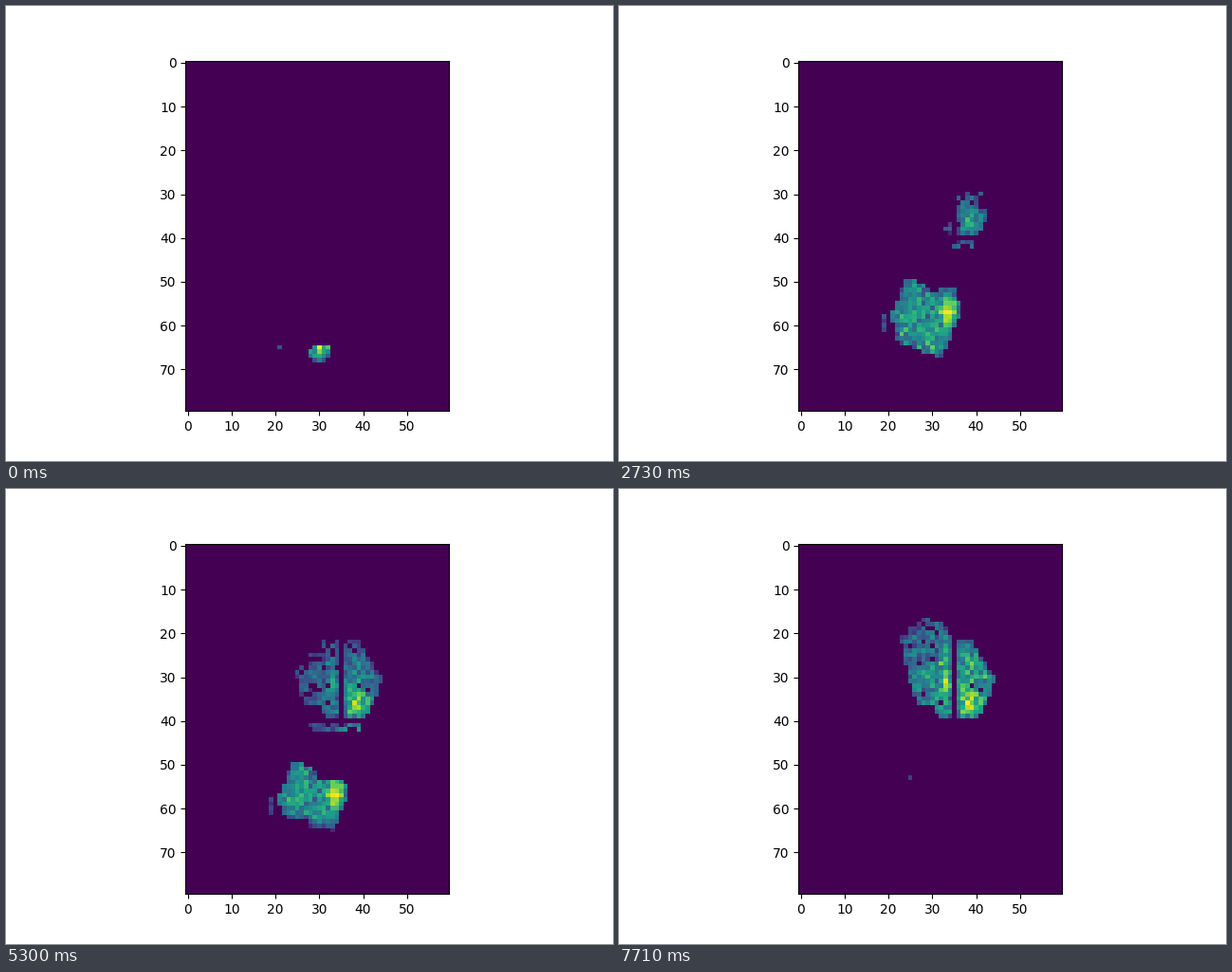
These frames come from a looping animation (640x480 px, 8 s). A matplotlib script:

```python
import numpy as np
import matplotlib.pyplot as plt
from matplotlib.animation import FuncAnimation
from matplotlib.path import Path

ROWS, COLS = 80, 60
TICK, LOOP = 40, 8000

rng = np.random.default_rng(12)
r, c = np.mgrid[0:ROWS, 0:COLS].astype(float)
grain = np.clip(rng.normal(0, 0.12, r.shape), -0.25, 0.25)
delay = rng.exponential(1, r.shape)
jitter = rng.normal(0, 1, r.shape)
chance = rng.random(r.shape)


def bump(x, y, sx, sy, amp):
    return amp * np.exp(-((c - x) / sx) ** 2 / 2 - ((r - y) / sy) ** 2 / 2)


def polygon(points):
    cells = np.column_stack([c.ravel(), r.ravel()])
    return Path(points).contains_points(cells).reshape(r.shape)


def edge_shade(mask):
    """Darken cells that have few neighbours in the mask."""
    shifts = [(i, j) for i in (-1, 0, 1) for j in (-1, 0, 1)]
    count = sum(np.roll(mask, s, (0, 1)).astype(float) for s in shifts)
    return 0.45 + 0.55 * count / 9


def lower_patch():
    body = polygon([(24, 49.5), (28.3, 50.5), (30, 52.4), (35.2, 50.6),
                    (36.5, 57), (33.4, 65), (32, 67.4), (27.5, 66),
                    (21.6, 63.5), (20.6, 57.5)])
    seed = np.hypot(c - 30.2, r - 66.4)
    stray = (c == 19) & (abs(r - 59.5) < 2)
    spark = (c == 21) & (r == 65)
    mask = body | stray | spark | (seed < 2.3)
    start = np.where((seed < 2.3) | spark, 0, 0.36 * seed - 0.6 + 0.8 * delay)

    # Cells die out towards two last centres, faster above and between them.
    dx, dy = c - 25, r - 56.5
    near_a = np.hypot(np.where(dx > 0, 2 * dx, dx), r - 54)
    near_b = np.hypot(c - 33, np.where(dy < 0, 2.5 * dy, dy))
    end = 43.8 - 0.18 * np.minimum(near_a, near_b) ** 2 + jitter
    end = np.where(body, end, np.where(stray, 34, 6))

    level = 0.5 + grain + bump(33.7, 56.3, 1.3, 1.8, 0.4)
    level += bump(33, 59, 1.5, 3, 0.1) + bump(25.5, 58.3, 0.9, 1, 0.25)
    return mask, start, end, level * edge_shade(body), 14


def upper_patch():
    body = polygon([(28, 16.4), (32.6, 18), (34.4, 21.6), (39, 21.5),
                    (41.5, 26), (44.5, 30.5), (43, 34.5), (41, 39.4),
                    (31.6, 39.4), (30, 36.5), (26.6, 37), (24.6, 30),
                    (22.6, 21)])
    body &= (c != 35) & (chance > 0.05)
    start = 3 + 1.3 * 1.15 * np.hypot(c - 40, r - 38)
    start += np.where(c < 35, 4, 2) * delay + 3 * np.maximum(0, c - 41)
    end = np.full(r.shape, np.inf)

    # Thin strip underneath that spreads leftwards and is gone at the end.
    strip = (abs(r - 41.5) < 1) & (abs(c - 33.5) < 6) & (chance > 0.3)
    start = np.where(strip, 7 + 1.6 * (39 - c) + 2 * delay, start)
    fade = np.minimum(43 - np.maximum(0, c - 34) + jitter, 44.5)
    end = np.where(strip, fade, end)

    level = 0.5 + grain + bump(38.3, 34, 1.8, 4.5, 0.18)
    level += bump(33, 28, 1, 6, 0.1) + bump(33.2, 31.8, 0.9, 1.1, 0.35)
    level += bump(37.8, 37.3, 1, 1.4, 0.2)
    level = np.where(strip, 0.4 + grain, level * edge_shade(body))
    return body | strip, start, end, level, 22


PATCHES = [lower_patch(), upper_patch()]


def field(step):
    out = np.zeros((ROWS, COLS))
    for mask, start, end, level, rise in PATCHES:
        live = mask & (step >= start) & (step < end)
        grow = 0.5 + 0.5 * np.clip((step - start) / rise, 0, 1)
        fade = np.sqrt(np.clip((end - step) / 5, 0.1, 1))
        out = np.where(live, np.clip(level, 0.18, 1.05) * grow * fade, out)
    return out


# Even steps with three longer rests.
holds = np.full(45, 160)
holds[[2, 20, 34]] = 330
times = np.concatenate([[0], np.cumsum(holds)])
fields = [field(s) for s in range(len(times))]

fig, ax = plt.subplots(figsize=(6.4, 4.8), dpi=100)
image = ax.imshow(fields[0], cmap="viridis", interpolation="nearest")


def update(i):
    step = np.searchsorted(times, i * TICK + 30, side="right") - 1
    image.set_data(fields[step])
    image.set_clim(0, fields[step].max())
    return [image]


anim = FuncAnimation(fig, update, frames=LOOP // TICK, interval=TICK,
                     repeat=True, repeat_delay=0)
plt.show()
```
